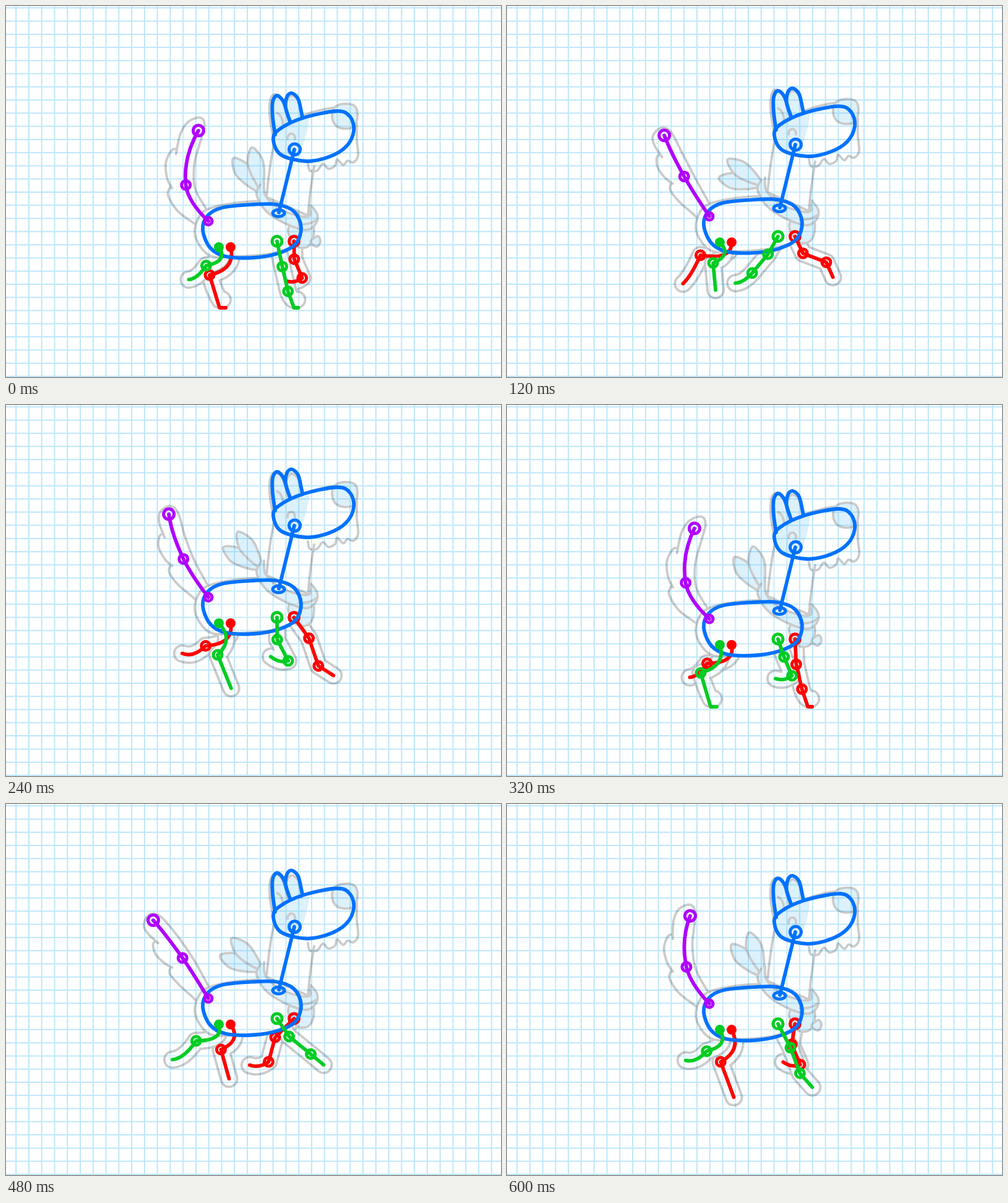
Animation, 800 px wide and 600 px high, one loop 640 ms. Source, as an HTML page:

```html
<!DOCTYPE html>
<html lang="en">
<head>
<meta charset="utf-8">
<title>Dog run cycle</title>
<style>
  html, body { margin: 0; width: 100%; height: 100%; overflow: hidden; background: #fff; }
  svg { display: block; width: 800px; height: 600px; }
  path, circle, ellipse { fill: none; stroke-linecap: round; stroke-linejoin: round; }
  #grid { stroke: #bde7fb; stroke-width: 2; }
  #ghost { opacity: .2; }
  #ghost path { stroke: #000; stroke-width: 3.8; }
  #ghost .white { fill: #fff; }
  #ghost .tint { fill: #5cbef0; }
  #ghost .patch { fill: #5cbef0; stroke: none; }
  #ghost .limb { stroke-width: 30; }
  #ghost .inner { stroke: #fff; stroke-width: 22.4; }
  .bone { stroke-width: 5.8; }
  .red { stroke: #f00; }
  .green { stroke: #00cc22; }
  .blue { stroke: #0072ff; }
  .purple { stroke: #b000ff; }
  .red .dot { fill: #f00; }
  .green .dot { fill: #00cc22; }
</style>
</head>
<body>
<svg viewBox="0 0 800 600">
  <path id="grid"/>
  <g id="ghost"></g>
  <g id="rig"></g>
</svg>
<script>
const LOOP = 640, STRIDE = LOOP / 2, STEP = 40, FLOOR = 488;
const { sin, cos, PI, min, max, floor, hypot } = Math;
const clamp = (v, a, b) => max(a, min(b, v));
const rad = deg => deg * PI / 180;

// Swing around a mean: one term per cycle and one per half cycle
const wave = (a, mean, c1 = 0, s1 = 0, c2 = 0, s2 = 0) =>
  mean + c1 * cos(a) + s1 * sin(a) + c2 * cos(2 * a) + s2 * sin(2 * a);

// Body height in one stride: contact, down, up, top, fall
const BOUNCE = [[0, -1], [80, 12], [160, -32.5], [240, -37], [280, -25.5]];

function bounce(t) {
  t %= STRIDE;
  const n = BOUNCE.length;
  const key = j => {
    const [time, y] = BOUNCE[(j + n) % n];
    return [time + floor(j / n) * STRIDE, y];
  };
  let i = n - 1;
  while (BOUNCE[i][0] > t) i--;
  const [a, b, c, d] = [key(i - 1), key(i), key(i + 1), key(i + 2)];
  const span = c[0] - b[0], u = (t - b[0]) / span, v = 1 - u;
  const slope = (p, q) => (q[1] - p[1]) / (q[0] - p[0]) * span;
  return b[1] * v * v * (1 + 2 * u) + c[1] * u * u * (1 + 2 * v) +
    u * v * (v * slope(a, c) - u * slope(b, d));
}

// Smooth path through points
function smooth(pts, closed) {
  const n = pts.length;
  const at = i => closed ? pts[(i + n) % n] : pts[clamp(i, 0, n - 1)];
  let d = `M${pts[0]}`;
  for (let i = 0; i < (closed ? n : n - 1); i++) {
    const [a, b, c, e] = [at(i - 1), at(i), at(i + 1), at(i + 2)];
    const c1 = [0, 1].map(k => b[k] + (c[k] - a[k]) / 6);
    const c2 = [0, 1].map(k => c[k] - (e[k] - b[k]) / 6);
    d += `C${c1} ${c2} ${c}`;
  }
  return d;
}
const pairs = text => text.split(' ').map(p => p.split(',').map(Number));
const curve = (text, closed) => smooth(pairs(text), closed);
const path = (d, cls) => `<path class="${cls}" d="${d}"/>`;
const ring = (x, y, r) => `<circle cx="${x}" cy="${y}" r="${r}" stroke-width="5"/>`;
const dot = (x, y) => `<circle class="dot" cx="${x}" cy="${y}" r="5.5" stroke-width="5"/>`;
const group = (cls, s) => `<g class="${cls}">${s}</g>`;
const shift = (dy, s) => `<g transform="translate(0 ${dy})">${s}</g>`;

// Next joint of a leg: angle in degrees forward from straight down
const joint = ([x, y], deg, len) =>
  [x + sin(rad(deg)) * len, min(y + cos(rad(deg)) * len, FLOOR)];

// Last bone, sagging when the foot trails, with a flat toe on the ground
function footLine([wx, wy], [fx, fy], sag, ground, toe) {
  const sagY = (wy + fy) / 2 + max(0, wx - fx) * sag;
  const k = clamp((fy - 479) / 5, 0, 1);
  return `Q${(wx + fx) / 2} ${min(sagY, ground)} ${fx} ${min(fy, ground)}l${toe * k} 0`;
}

function hindLeg(hipX, hipY, a, sway) {
  const hip = [hipX, hipY];
  const hock = joint([hipX + sway, hipY], wave(a, -43, 8, -20, -2, -15), wave(a, 51, 3.5, 5.5, 2, -2));
  const foot = joint(hock, wave(a, -18, 33, -33.5, 0, 7), wave(a, 49, 13));
  const bulge = [(hipX + hock[0]) / 2 + 26, (hipY + hock[1]) / 2 + (hipX - hock[0]) * .38];
  const line = (ground, toe) => `M${hip}Q${bulge} ${hock}` + footLine(hock, foot, .35, ground, toe);
  return { line, toe: 10, joints: dot(...hip) + ring(...hock, 7) };
}

function foreLeg(hipX, hipY, a, sway) {
  const hip = [hipX, hipY];
  const elbow = joint([hipX + sway, hipY], wave(a, -2, -1, 39.5, 3.7, -9), wave(a, 37, -6, -4, -2, -3));
  const wrist = joint(elbow, wave(a, 18, 22, 33, 0, -5) - 17 * cos(3 * a), wave(a, 40, -4, 2, -3, -3));
  const foot = joint(wrist, wave(a, -23, -49, 65, -8), wave(a, 29, -2, -2));
  const line = (ground, toe) => `M${hip}L${elbow}L${wrist}` + footLine(wrist, foot, .27, ground, toe);
  return { line, toe: 7, joints: ring(...hip, 8) + ring(...elbow, 7) + ring(...wrist, 7) };
}
const drawLeg = leg => path(leg.line(FLOOR, leg.toe), 'bone') + leg.joints;
const limb = leg => ['limb', 'limb inner'].map(cls => path(leg.line(475, 5), cls)).join('');

// Tail as two joined curves; a is the stride angle, lean moves the tip
function tailSpine(a, dy, lean) {
  const base = [327, 348 + dy];
  const mid = [wave(a, 287.5, 2.2) + lean / 4, wave(a, 286, 3.5) + dy];
  const tip = [wave(a, 272.5, 34.5, 6.5) + lean, wave(a, 211.5, -10, -2) + dy];
  const along = k => mid.map((m, i) => m + (tip[i] - base[i]) * k);
  return [base, along(-.18), mid, along(.3), tip];
}

function tailBones([base, c1, mid, c2, tip]) {
  return path(`M${base}Q${c1} ${mid}Q${c2} ${tip}`, 'bone') +
    ring(...base, 6) + ring(...mid, 7) + ring(...tip, 8.5);
}

function tailFur(spine) {
  // Point at s along the spine, n pixels to its left
  const place = ([s, n]) => {
    const [p, c, q] = spine.slice(s < .5 ? 0 : 2);
    const u = s < .5 ? 2 * s : 2 * s - 1, v = 1 - u;
    const pos = p.map((_, i) => v * v * p[i] + 2 * u * v * c[i] + u * u * q[i]);
    const dir = p.map((_, i) => v * (c[i] - p[i]) + u * (q[i] - c[i]));
    const len = hypot(...dir);
    return [pos[0] + dir[1] / len * n, pos[1] - dir[0] / len * n];
  };
  return [
    '.5,24 .42,31 .25,28 .08,20 0,17',
    '.8,18 .78,25 .68,31 .56,28 .48,22',
    '.1,-11 .4,-14 .7,-15 .95,-14 1.07,-8 1.1,4 1.03,17 .92,20 .76,17'
  ].map(s => path(smooth(pairs(s).map(place)), 'white')).join('');
}

// Scarf end leaning back by an angle
function leaf(rx, ry, lean, len) {
  const dx = -sin(rad(lean)), dy = -cos(rad(lean));
  const at = (s, n) => [rx + dx * s * len - dy * n, ry + dy * s * len + dx * n];
  return path(smooth([at(0, 0), at(.35, 10), at(.7, 12), at(1, 0), at(.7, -12), at(.35, -10)], true), 'tint');
}

const ghostBody = path(curve('330,328 400,317 455,325 479,350 470,385 430,401 370,406 330,405 307,377 309,348', true), 'white');

const ghostFlap = path(curve('470,342 494,350 497,372 488,388 469,387 456,362', true), 'tint');
const ghostKnot = path(curve('492,380 504,371 508,380 502,388', true), 'tint');

const ghostScarf =
  path('M433 222Q425 262 421 308L488 338Q491 300 498 258', 'white') +
  path(curve('411,288 405,304 420,330 450,350 484,361 500,352 503,336 490,320 491,338 468,337 438,324 419,305 417,284'), 'tint') +
  path('M474 352Q492 353 501 345', '');

const ghostHead =
  path(curve('431,207 426,175 428,148 437,142 448,154 457,186'), 'tint') +
  path(curve('457,186 452,160 460,144 472,152 478,180'), 'tint') +
  path('M438 172Q447 176 448 192', '') +
  path(curve('488,253 491,265 503,265 512,254 521,262 532,257 535,247 545,256 552,249 561,252 569,241 567,215 567,188'), '') +
  path('M442 198Q462 183 490 178Q488 205 475 236Q460 246 446 238Q432 226 435 208Z', 'patch') +
  path('M455 214C454 203 468 202 467 214', '') +
  path('M480 176Q506 166 532 163', '') +
  path(curve('527,176 532,162 548,157 564,161 568,177 562,194 545,197 532,191', true), 'tint');

const blueRig = group('blue',
  path(curve('318,362 326,339 350,326 400,321 437,321 465,332 477,358 468,385 440,400 400,407 355,405 330,391', true), 'bone') +
  path('M466 232L441 334', 'bone') + ring(466.5, 232, 9) +
  '<ellipse cx="440.5" cy="335" rx="9.5" ry="5.5" stroke-width="5"/>' +
  path(curve('432,217 441,200 480,181 535,170 556,179 562,202 550,227 522,244 485,251 445,241', true), 'bone') +
  path(curve('435,208 431,180 431,155 438,145 448,154 455,175 459,186 452,165 454,147 462,141 472,150 477,170 479,180'), 'bone'));

let lines = '';
for (let x = 16.2; x < 800; x += 20.77) lines += `M${x} 0V600`;
for (let y = 3.1; y < 600; y += 21.28) lines += `M0 ${y}H800`;
document.getElementById('grid').setAttribute('d', lines);

const ghost = document.getElementById('ghost'), rig = document.getElementById('rig');

function draw(t) {
  const a = 2 * PI * t / LOOP, b = a + PI, stride = 2 * a;
  const base = bounce(t);
  const dy = base + 1.4 * cos(a - PI / 4);
  const gy = base * .93 + 2;

  const far = [hindLeg(363, 390 + dy, a, 0), foreLeg(465.5, 380.5 + dy, a, 0)];
  const near = [
    hindLeg(344, 390 + dy, b, 11 - 8 * cos(b)),
    foreLeg(438, 380.5 + dy, b, 8 - 8 * cos(b - rad(100)))];
  const lean = wave(stride, 36, -15.5, 10, -7.6);
  const knot = cos(stride) > .5 ? ghostKnot : '';

  ghost.innerHTML = [...far, ...near].map(limb).join('') +
    tailFur(tailSpine(stride, base, 0)) + shift(base, ghostBody) +
    shift(gy, ghostFlap + knot + leaf(407, 298, lean + 24, 66) + leaf(413, 296, lean, 70) +
      ghostScarf + ghostHead);
  rig.innerHTML = group('red', far.map(drawLeg).join('')) + shift(dy, blueRig) +
    group('purple', tailBones(tailSpine(stride, dy, 4 * cos(a)))) +
    group('green', near.map(drawLeg).join(''));
}

const start = performance.now();
let shown = -1;
function tick() {
  const t = floor((performance.now() - start) / STEP) * STEP % LOOP;
  if (t !== shown) draw(shown = t);
  requestAnimationFrame(tick);
}
tick();
</script>
</body>
</html>
```
